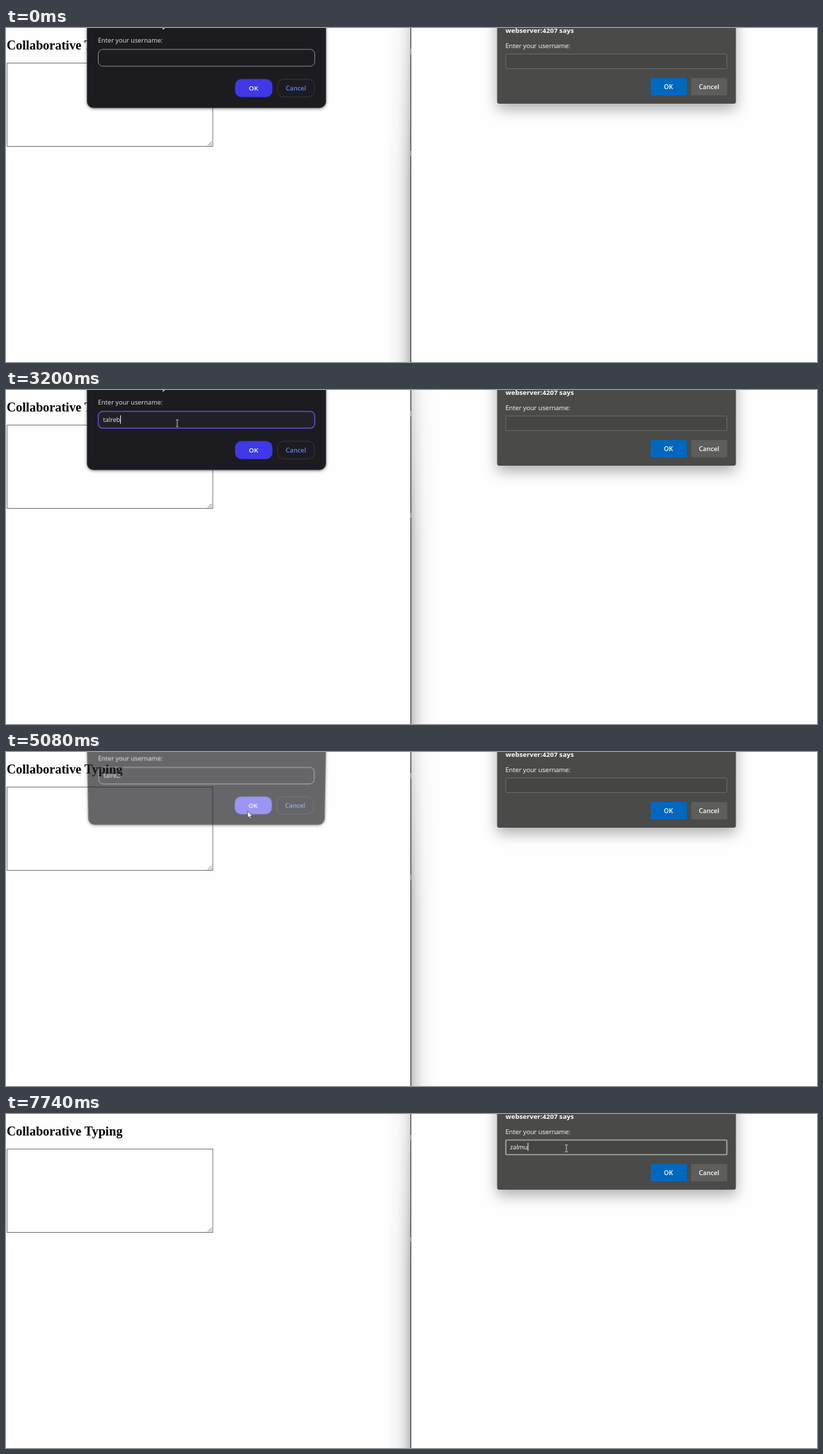
Animation, 1165 px wide and 481 px high, one loop 8000 ms. Source, as an HTML page:

```html
<!DOCTYPE html>
<html lang="en">
<head>
<meta charset="utf-8">
<title>Two windows, two prompts</title>
<style>
html, body { margin: 0; width: 100%; height: 100%; overflow: hidden; background: #fefefe; }
svg { position: absolute; left: 0; top: 0; width: 1165px; height: 481px; }
text { font: 9.2px 'Open Sans', sans-serif; fill: #fff; white-space: pre; }
.heading { font: bold 18.4px 'Liberation Serif', serif; fill: #000; }
.title { font-size: 9.6px; font-weight: 700; }
.button { font-weight: 600; text-anchor: middle; }
.typed { font-size: 9px; }
#leftDialog { transform-origin: 288px 0; }
#leftDialog text { fill: #e6e4ea; }
#leftDialog .cancel { fill: #5f8ae8; }
#leftPanel { filter: drop-shadow(0 1px 2px rgba(0, 0, 0, .45)); }
#rightPanel { filter: drop-shadow(0 8px 10px rgba(0, 0, 0, .32)); }
</style>
</head>
<body>
<svg>
  <defs>
    <linearGradient id="falloff">
      <stop offset="0" stop-opacity=".26"/>
      <stop offset=".22" stop-opacity=".13"/>
      <stop offset=".5" stop-opacity=".045"/>
      <stop offset="1" stop-opacity="0"/>
    </linearGradient>
    <linearGradient id="fade" x2="0" y2="1">
      <stop offset="0" stop-color="#888"/>
      <stop offset=".45" stop-color="#fff"/>
    </linearGradient>
    <mask id="topFade" maskUnits="userSpaceOnUse" x="0" y="0" width="40" height="481">
      <rect width="40" height="481" fill="url(#fade)"/>
    </mask>
  </defs>

  <text class="heading" x="1" y="30.5">Collaborative Typing</text>
  <rect x="1.5" y="50.5" width="295.5" height="120" fill="#fff" stroke="#767676"/>
  <path d="M290 169.5l5.5-5.5M293.3 169.5l2.2-2.2" stroke="#555" stroke-width=".9"/>

  <g id="edgeShadow">
    <rect width="34" height="481" fill="url(#falloff)" mask="url(#topFade)"/>
  </g>
  <path d="M581.5 0V481" stroke="#444" stroke-width="1.3"/>
  <path d="M581.5 30v8M581.5 177v7" stroke="#999" stroke-width="1.3"/>

  <rect id="rightPanel" x="705.5" y="-30" width="343" height="139" rx="3" fill="#4a4a48"/>
  <text class="title" x="717.5" y="7">webserver:4207 says</text>
  <text x="717.5" y="29">Enter your username:</text>
  <rect id="rightField" x="718" y="37.5" width="317.5" height="21" rx="1" fill="#454543"/>
  <text class="typed" id="rightText" x="724" y="50.7"></text>
  <path id="rightCaret" d="M0 41.5V53" stroke="#fff" stroke-width=".9"/>
  <rect x="926" y="72" width="52" height="25" rx="1.5" fill="#0068bf"/>
  <text class="button" x="951.5" y="87.5">OK</text>
  <rect x="984" y="72" width="52" height="25" rx="1.5" fill="#5d5d5c"/>
  <text class="button" x="1010" y="87.5">Cancel</text>
</svg>

<svg id="leftDialog">
  <rect id="leftPanel" x="116.5" y="-30" width="343" height="145" rx="9" fill="#1c1b1f" stroke="#49484c" stroke-width=".8"/>
  <text class="title" x="132" y="-1.3" style="font-size:10.1px">webserver:4207 says</text>
  <text x="132" y="20.7">Enter your username:</text>
  <rect id="leftField" x="132.5" y="30.8" width="311" height="24.2" rx="6.5"/>
  <text class="typed" id="leftText" x="139.5" y="45.7"></text>
  <path id="leftCaret" d="M0 36.5V48.5" stroke="#fff" stroke-width=".9"/>
  <rect id="leftOk" x="329" y="73.5" width="53.7" height="26" rx="9"/>
  <text class="button" x="355.5" y="90.3" style="font-size:9.6px;fill:#fff">OK</text>
  <rect x="390" y="73.8" width="53" height="25.4" rx="9" fill="none" stroke="#38373c"/>
  <text class="button cancel" x="416.5" y="90.3">Cancel</text>
</svg>

<svg>
  <g id="pointer">
    <circle id="click" r="9" fill="#dacb00" fill-opacity=".64"/>
    <path id="arrow" d="M0 0V9.8L2.2 7.8 3.8 11.2 5.4 10.5 3.9 7.2H6.9Z" fill="#fff" stroke="#222" stroke-width=".6"/>
    <path id="beam" d="M-2 -5H-.5L0 -4.5 .5 -5H2M0 -4.5V4.5M-2 5H-.5L0 4.5 .5 5H2" fill="none" stroke="#d4d4d4" stroke-width=".9"/>
  </g>
</svg>

<script>
const LOOP = 8000, BLINK = 530;
const $ = id => document.getElementById(id);
const ramp = (t, from, to) => Math.min(1, Math.max(0, (t - from) / (to - from)));
const smooth = k => k * k * (3 - 2 * k);
const within = (t, from, to) => t >= from && t < to;
const set = (id, attrs) => {
  for (const name in attrs) $(id).setAttribute(name, attrs[name]);
};
const show = (id, on) => set(id, { visibility: on ? 'visible' : 'hidden' });
const mix = (a, b, k) => `rgb(${a.map((v, i) => Math.round(v + (b[i] - v) * k))})`;

// Pointer stops: time, x, y
const path = [
  [380, 860, 404], [590, 570, 245], [720, 570, 245], [1540, 245, 46.5],
  [2000, 246, 47.5], [3860, 246, 48], [4320, 340.5, 80], [4580, 347, 85],
  [5170, 347, 85], [5600, 824, 83], [5670, 824, 83], [5870, 809, 52],
  [5960, 809, 52], [6080, 805, 49.5]
];

const prompts = {
  left: { x: 139.5, name: 'talreb', keys: [2670, 2770, 2860, 2960, 3060, 3200], focus: 2070, blur: 4850 },
  right: { x: 724, name: 'zalmu', keys: [7140, 7340, 7440, 7540, 7740], focus: 6540, blur: LOOP }
};

function pointerAt(t) {
  const next = path.findIndex(stop => stop[0] > t);
  if (next < 0) return path.at(-1).slice(1);
  const a = path[Math.max(0, next - 1)], b = path[next];
  const k = smooth(ramp(t, a[0], b[0]));
  return [a[1] + (b[1] - a[1]) * k, a[2] + (b[2] - a[2]) * k];
}

function drawTyping(side, t) {
  const { x, name, keys, focus, blur } = prompts[side];
  const typed = keys.filter(key => key <= t);
  const label = $(side + 'Text');
  label.textContent = name.slice(0, typed.length);
  const width = typed.length ? label.getComputedTextLength() : 0;
  const sinceKey = t - (typed.at(-1) ?? focus);
  set(side + 'Caret', { transform: `translate(${x + width + .5})` });
  show(side + 'Caret', within(t, focus, blur) && sinceKey % (2 * BLINK) < BLINK);
  return within(t, focus, blur);
}

function drawLeft(t) {
  const focused = drawTyping('left', t);
  const hover = ramp(t, 1560, 1800) * (1 - ramp(t, 3960, 4100));
  set('leftField', {
    fill: mix([28, 27, 31], focused ? [33, 32, 37] : [50, 49, 54], hover),
    stroke: focused ? '#5a4fd0' : '#8b8990',
    'stroke-width': focused ? 1.5 : 1
  });
  set('leftOk', { fill: mix([64, 56, 232], [106, 97, 240], ramp(t, 4150, 4290)) });

  const close = ramp(t, 5010, 5230), tilt = Math.min(1, close * 3);
  const style = $('leftDialog').style;
  style.opacity = 1 - close;
  style.transform = close
    ? `translateY(${-7.3 * tilt - 4 * close}px) perspective(1000px) rotateX(${-6 * tilt}deg)`
    : 'none';
}

function drawRight(t) {
  const focused = drawTyping('right', t);
  set('rightField', {
    stroke: focused ? '#a9a9a7' : '#6a6a68',
    'stroke-width': focused ? 1.7 : 1
  });
}

function drawPointer(t) {
  const [x, y] = pointerAt(t);
  const visible = t >= 390;
  const beam = within(t, 1600, 3980) || t >= 6010;
  set('pointer', { transform: `translate(${x} ${y})` });
  show('arrow', visible && !beam);
  show('beam', visible && beam);
  show('click', [2000, 4850, 6470].some(start => within(t, start, start + 140)));
}

function draw(now) {
  const t = now % LOOP;
  const leftActive = within(t, 2000, 6470);
  set('edgeShadow', { transform: leftActive ? 'translate(582)' : 'translate(581) scale(-1 1)' });
  drawLeft(t);
  drawRight(t);
  drawPointer(t);
}

const start = performance.now();
(function tick() {
  draw(performance.now() - start);
  requestAnimationFrame(tick);
})();
</script>
</body>
</html>
```
